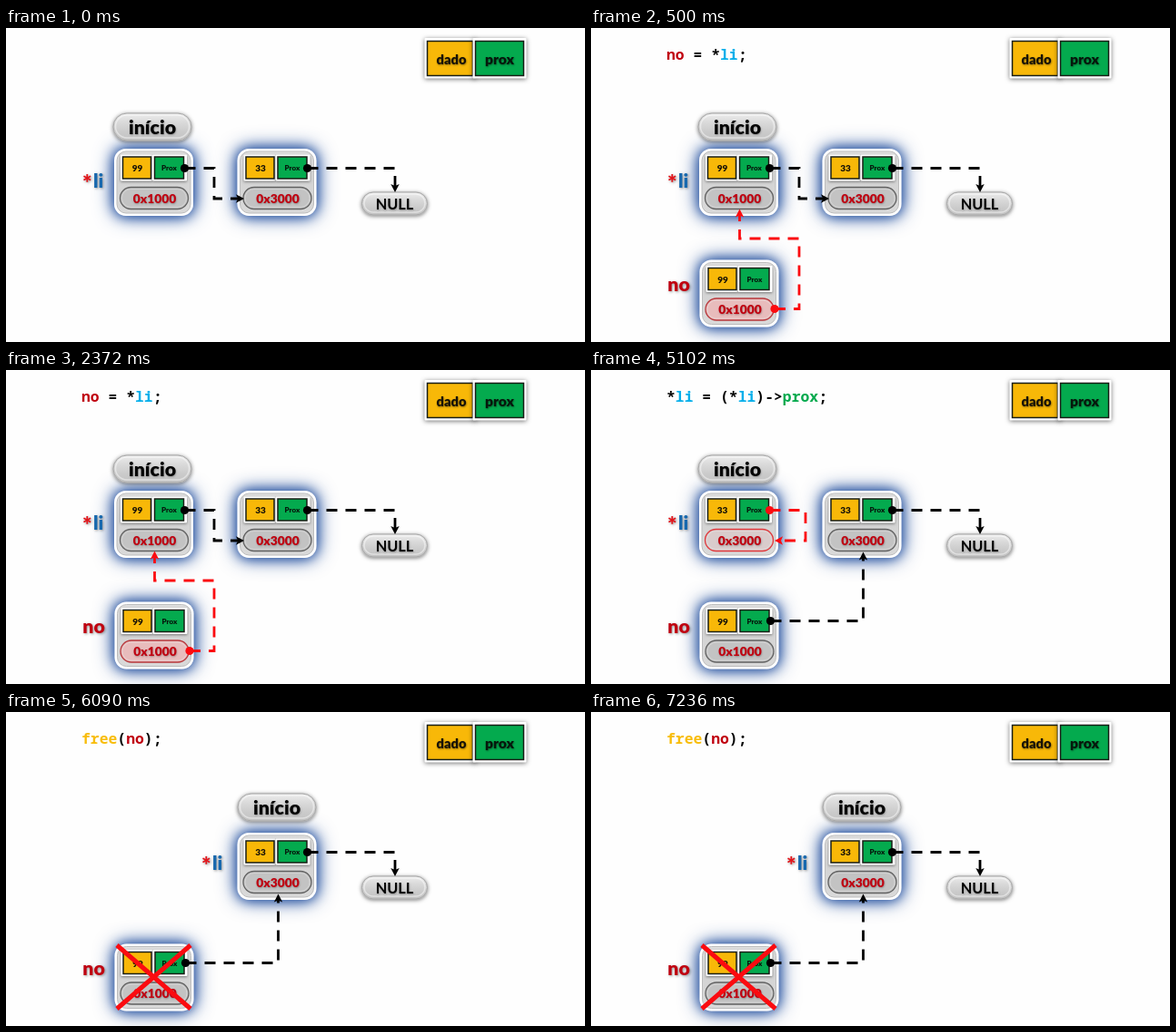
An HTML page with a canvas that plays this animation: 637 px wide and 346 px high, repeating every 8000 ms.

```html
<!DOCTYPE html>
<html lang="pt">
<head>
<meta charset="utf-8">
<title>Lista encadeada</title>
<style>
html, body { margin: 0; width: 100%; height: 100%; overflow: hidden; background: #fff; }
canvas { display: block; width: 637px; height: 346px; }
</style>
</head>
<body>
<canvas id="stage" width="637" height="346"></canvas>
<script>
const ctx = document.getElementById('stage').getContext('2d');
const LOOP = 8000;
const STEPS = [0, 500, 3620, 6090];
const SANS = 'Lato, "Open Sans", sans-serif';
const MONO = '"Noto Sans Mono", "DejaVu Sans Mono", monospace';
const YELLOW = '#f8b808', GREEN = '#04aa4e', DARK_RED = '#c00010', RED = '#fb0b10';
const CYAN = '#00aeea', BLACK = '#000';

function withShadow(color, blur, dx, dy, draw) {
  ctx.save();
  ctx.shadowColor = color;
  ctx.shadowBlur = blur;
  ctx.shadowOffsetX = dx;
  ctx.shadowOffsetY = dy;
  draw();
  ctx.restore();
}

function roundBox(x, y, w, h, r, fill, stroke, lineWidth = 1) {
  ctx.beginPath();
  ctx.roundRect(x, y, w, h, r);
  if (fill) { ctx.fillStyle = fill; ctx.fill(); }
  if (stroke) {
    ctx.strokeStyle = stroke;
    ctx.lineWidth = lineWidth;
    ctx.stroke();
  }
}

function vertical(y, h, ...colors) {
  const g = ctx.createLinearGradient(0, y, 0, y + h);
  colors.forEach((c, i) => g.addColorStop(i / (colors.length - 1), c));
  return g;
}

function text(str, x, baseline, size, color, align = 'center', weight = 900, family = SANS) {
  ctx.font = `${weight} ${size}px ${family}`;
  ctx.textAlign = align;
  ctx.textBaseline = 'alphabetic';
  ctx.fillStyle = color;
  ctx.fillText(str, x, baseline);
}

function code(parts) {
  let x = 83;
  for (const [str, color] of parts) {
    text(str, x, 35, 16.4, color, 'left', 'bold', MONO);
    x += ctx.measureText(str).width;
  }
}

function cell(x, y, w, h, color) {
  roundBox(x, y, w, h, 0, color, '#171c14', 1.5);
}

function legend() {
  withShadow('rgba(0,0,0,.55)', 5, 0, 1, () => roundBox(460.5, 11, 57, 44.5, 1, '#fff'));
  cell(463.5, 14.5, 50, 38, YELLOW);
  withShadow('rgba(0,0,0,.55)', 5, 0, 1, () => roundBox(513.5, 11, 59, 44.5, 1, '#fff'));
  cell(516.5, 14.5, 53, 38, GREEN);
  withShadow('rgba(0,0,0,.45)', 2, .5, 1, () => {
    text('dado', 490, 39.5, 14.6, '#171207');
    text('prox', 543, 40, 15.6, '#06170c');
  });
}

function badge(label, x, y, w, h, size, baseline, weight) {
  withShadow('rgba(0,0,0,.5)', 4, 0, 1, () =>
    roundBox(x, y, w, h, h / 2, '#ccc'));
  roundBox(x + .5, y + .5, w - 1, h - 1, h / 2,
    vertical(y, h, '#eeeeee', '#dadada', '#cbcbcb', '#c2c2c2'), '#a9a9a9');
  roundBox(x + 3, y + 2.5, w - 6, h - 6, h / 2, null, 'rgba(255,255,255,.45)', 1.5);
  withShadow('rgba(0,0,0,.3)', 2, .5, 1, () =>
    text(label, x + w / 2, baseline, size, '#050505', 'center', weight));
}

function node(x, y, value, address, pill = '#c3c3c3', rim = '#626262') {
  for (const blur of [22, 13]) {
    withShadow('#23509f', blur, 0, 0, () => roundBox(x, y, 87, 74, 13, '#fff'));
  }
  roundBox(x + 3, y + 3, 81, 68, 10,
    vertical(y, 75, '#e2e2e2', '#d4d4d4', '#dadada'), '#bcbcbc');

  withShadow('rgba(0,0,0,.45)', 3, 0, 1, () => roundBox(x + 7, y + 6.5, 35, 29, 1, '#fff'));
  cell(x + 9.5, y + 9, 31, 24, YELLOW);
  withShadow('rgba(0,0,0,.45)', 3, 0, 1, () => roundBox(x + 42, y + 6.5, 38, 29, 1, '#fff'));
  cell(x + 44.5, y + 9, 32, 24, GREEN);
  text(value, x + 25.5, y + 25, 10, '#171207');
  text('Prox', x + 60.5, y + 24, 8, '#06170c');

  roundBox(x + 6.5, y + 42.5, 75, 24, 12, pill, rim, 1.3);
  roundBox(x + 8.5, y + 44.5, 71, 20, 10, null, 'rgba(235,235,235,.4)');
  withShadow('rgba(0,0,0,.3)', 2, .5, 1, () =>
    text(address, x + 44.5, y + 59.5, 13.8, DARK_RED));
}

function listLabel(x, baseline) {
  withShadow('rgba(0,0,0,.4)', 3, 1, 1, () => {
    text('*', x, baseline + 3, 25, '#e3161c', 'left');
    text('li', x + 12, baseline, 21.5, '#1768ae', 'left');
  });
}

function nodeLabel() {
  withShadow('rgba(0,0,0,.4)', 3, 1, 1, () => text('no', 96.5, 290, 21.3, DARK_RED));
}

// Dashed connector with a dot at its start and an arrowhead at its end.
function arrow(color, ...points) {
  const [sx, sy] = points[0];
  const [ex, ey] = points[points.length - 1];
  const [px, py] = points[points.length - 2];
  const angle = Math.atan2(ey - py, ex - px);

  ctx.save();
  ctx.strokeStyle = ctx.fillStyle = color;
  ctx.lineWidth = 2.8;
  ctx.setLineDash([12, 9]);
  ctx.beginPath();
  points.slice(0, -1).forEach(([x, y]) => ctx.lineTo(x, y));
  ctx.lineTo(ex - 5 * Math.cos(angle), ey - 5 * Math.sin(angle));
  ctx.stroke();

  ctx.beginPath();
  ctx.arc(sx, sy, 4.6, 0, Math.PI * 2);
  ctx.fill();

  ctx.translate(ex, ey);
  ctx.rotate(angle);
  ctx.beginPath();
  ctx.moveTo(0, 0);
  ctx.lineTo(-9, -4.7);
  ctx.lineTo(-7, 0);
  ctx.lineTo(-9, 4.7);
  ctx.fill();
  ctx.restore();
}

function cross() {
  ctx.strokeStyle = RED;
  ctx.lineWidth = 5;
  ctx.beginPath();
  ctx.moveTo(122, 257);
  ctx.lineTo(203, 327);
  ctx.moveTo(203, 257);
  ctx.lineTo(122, 327);
  ctx.stroke();
}

function drawStep(step) {
  const freed = step === 3;
  ctx.fillStyle = '#fefefe';
  ctx.fillRect(0, 0, 637, 346);
  legend();

  if (step === 1) code([['no', DARK_RED], [' = *', BLACK], ['li', CYAN], [';', BLACK]]);
  if (step === 2) {
    code([['*', BLACK], ['li', CYAN], [' = (*', BLACK], ['li', CYAN], [')->', BLACK],
      ['prox', GREEN], [';', BLACK]]);
  }
  if (freed) code([['free', '#f8bd0c'], ['(', BLACK], ['no', DARK_RED], [');', BLACK]]);

  if (step < 2) node(119, 133, '99', '0x1000');
  if (step === 2) node(119, 133, '33', '0x3000', '#d9cccc', '#e0383c');
  node(254.5, 133, '33', '0x3000');
  if (step === 1) node(119.5, 255.5, '99', '0x1000', '#e8bcbc', '#b8383c');
  if (step > 1) node(119.5, 255.5, '99', '0x1000');
  if (step > 0) nodeLabel();

  if (freed) {
    badge('início', 254.5, 89.5, 87, 31, 21.4, 112.5);
    listLabel(215, 174);
  } else {
    badge('início', 117.5, 93.5, 87, 31, 21.4, 116.5);
    listLabel(84, 176);
  }
  badge('NULL', 391, 180.5, 73, 26, 16.3, 199.5, 'bold');

  arrow(BLACK, [331.5, 154.5], [428, 154.5], [428, 181]);
  if (step < 2) arrow(BLACK, [196.5, 154.5], [229, 154.5], [229, 188], [262, 188]);
  if (step === 1) arrow(RED, [202, 309.5], [229, 309.5], [229, 232], [163.5, 232], [163.5, 199.5]);
  if (step === 2) arrow(RED, [196.5, 154.5], [236, 154.5], [236, 188], [202, 188]);
  if (step >= 2) arrow(BLACK, [197.5, 276.5], [299.5, 276.5], [299.5, 200.5]);
  if (freed) cross();
}

let shown = -1;
function tick(now) {
  const time = now % LOOP;
  const step = STEPS.findLastIndex(start => time >= start);
  if (step !== shown) drawStep(shown = step);
  requestAnimationFrame(tick);
}
requestAnimationFrame(tick);
</script>
</body>
</html>
```
